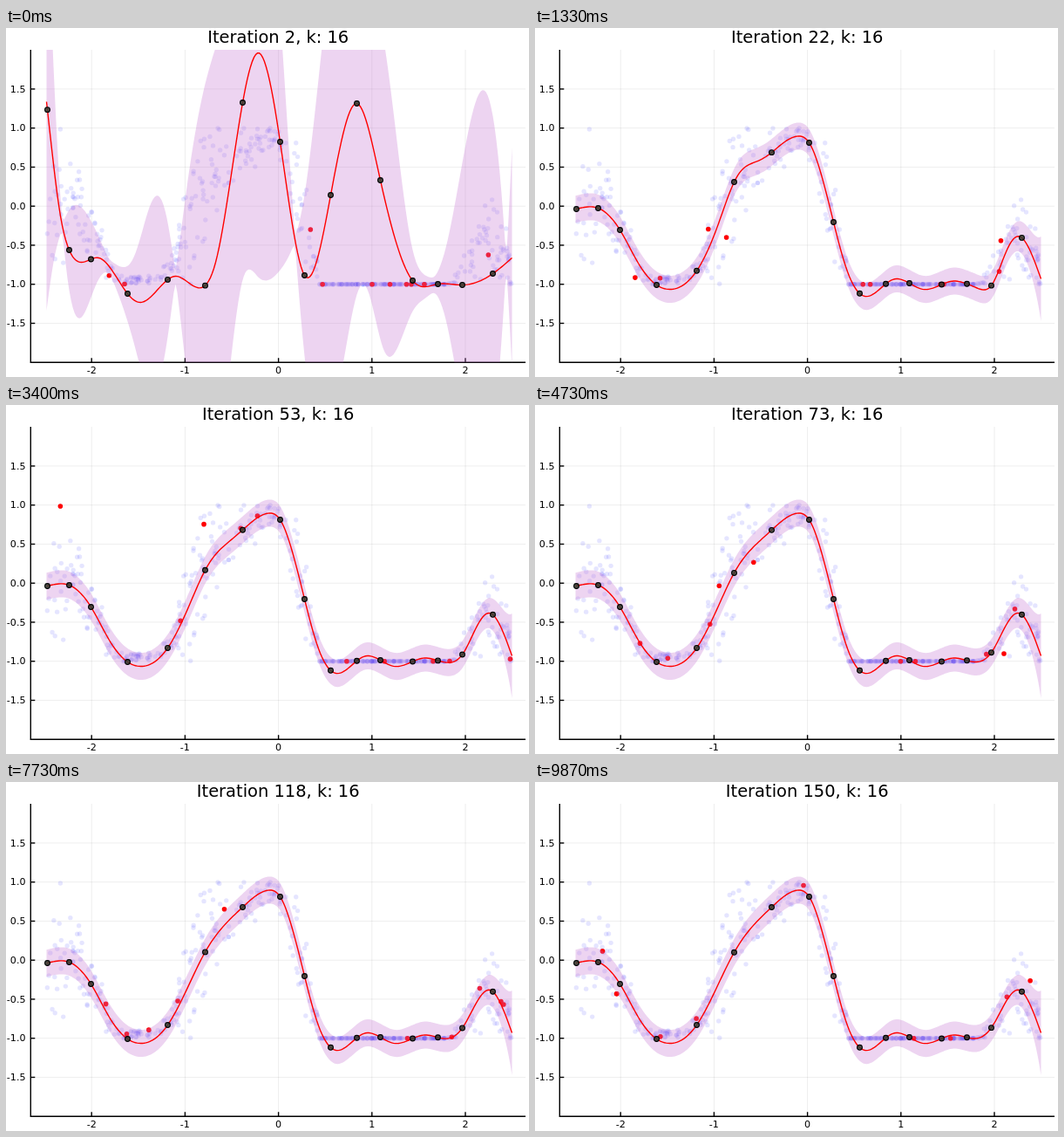
Recreate the animation shown at these times as an HTML page with a canvas. Size 600 by 400 pixels, loop 9.94 s.

```html
<!DOCTYPE html>
<html lang="en">
<head>
<meta charset="utf-8">
<title>Sparse regression fit</title>
<style>
html, body { margin: 0; width: 100%; height: 100%; overflow: hidden; background: #fff; }
canvas { display: block; }
</style>
</head>
<body>
<canvas id="plot" width="600" height="400"></canvas>
<script>
const ctx = document.getElementById('plot').getContext('2d');
const LOOP = 9940, STEP = 200 / 3, LAST = 148;
const LEFT = 28.3, RIGHT = 596, TOP = 25, BOTTOM = 383.2;
const px = v => 312.6 + 107.2 * v, py = v => 204.2 - 89.5 * v;
const CEIL = py(1), FLOOR = py(-1);
const lerp = (a, b, t) => a + (b - a) * t;
const bump = (x, center, width) => Math.exp(-(((x - center) / width) ** 2));

// Natural cubic spline through x, y, x, y, ...
function curve(...points) {
  const xs = points.filter((_, i) => i % 2 === 0), ys = points.filter((_, i) => i % 2);
  const n = xs.length, m = Array(n).fill(0), c = [0], d = [0];
  for (let i = 1; i < n - 1; i++) {
    const h0 = xs[i] - xs[i - 1], h1 = xs[i + 1] - xs[i];
    const bend = 6 * ((ys[i + 1] - ys[i]) / h1 - (ys[i] - ys[i - 1]) / h0);
    const pivot = 2 * (h0 + h1) - h0 * c[i - 1];
    c[i] = h1 / pivot;
    d[i] = (bend - h0 * d[i - 1]) / pivot;
  }
  for (let i = n - 2; i > 0; i--) m[i] = d[i] - c[i] * m[i + 1];
  return x => {
    let i = 1;
    while (i < n - 1 && x > xs[i]) i++;
    const h = xs[i] - xs[i - 1], a = (xs[i] - x) / h, b = 1 - a;
    return a * ys[i - 1] + b * ys[i] + ((a ** 3 - a) * m[i - 1] + (b ** 3 - b) * m[i]) * h * h / 6;
  };
}

const startMean = curve(46, 84, 53, 147, 61, 209, 72, 254, 85, 268, 106, 263, 139, 304, 153, 314,
  194, 284, 219, 297, 240, 268, 271, 85, 289, 28, 314, 130, 342, 283, 372, 191, 402, 86,
  429, 174, 466, 289, 495, 293, 523, 294, 558, 281, 580, 263);
// Signed half width: the band pinches where it crosses zero
const startSpread = curve(46, 239, 54, 112, 63, 10, 82, -64, 100, -36, 118, 0, 145, 45, 168, 109,
  181, 86, 194, 0, 207, -108, 226, -224, 240, -246, 258, -208, 271, -203, 289, -257, 317, -122,
  331, 0, 362, 221, 387, 262, 413, 190, 434, 175, 466, 34, 486, 4, 504, -40, 545, -217,
  572, -24, 580, 126);
const settledMean = curve(47, 207, 72, 206, 97, 231, 118, 269, 139, 294, 153, 299, 185, 278, 228, 195,
  271, 143, 301, 123.5, 314, 131, 342, 222, 357, 276, 378, 307, 411, 287.5, 445, 299,
  480, 289.5, 508, 293, 523, 281, 555, 238, 580, 287);
const settledSpread = x => 15.5 + 33 * Math.exp((x - 580) / 9);
const inducing = [47, 72, 97, 139, 185, 228, 271, 314, 342, 372, 402, 429, 466, 495, 523, 558];

function random(seed) {
  return () => {
    seed = (seed + 0x6D2B79F5) | 0;
    let r = Math.imul(seed ^ seed >>> 15, 1 | seed);
    r ^= r + Math.imul(r ^ r >>> 7, 61 | r);
    return ((r ^ r >>> 14) >>> 0) / 4294967296;
  };
}

// Samples scatter around the settled curve, folded back at both limits
const rand = random(16);
const noiseAt = x => 4 + 42 * bump(x, 58, 38) + 38 * bump(x, 222, 26) + 12 * bump(x, 275, 35)
  + 32 * bump(x, 335, 12) + 24 * bump(x, 560, 28);
const data = Array.from({ length: 490 }, () => {
  const x = lerp(44, 580, rand());
  const noise = (rand() + rand() + rand() - 1.5) * 2 * noiseAt(x);
  if (x > 357 && x < 505) return [x, FLOOR];
  let y = settledMean(x) + noise;
  if (y > FLOOR) y = 2 * FLOOR - y;
  if (y < CEIL) y = 2 * CEIL - y;
  return [x, y];
});

function minibatch(step) {
  const pick = random(step * 977 + 5);
  return Array.from({ length: 10 }, () => data[Math.floor(pick() * data.length)]);
}

function line(x0, y0, x1, y1, color, width) {
  ctx.strokeStyle = color;
  ctx.lineWidth = width;
  ctx.beginPath();
  ctx.moveTo(x0, y0);
  ctx.lineTo(x1, y1);
  ctx.stroke();
}
function dot(x, y, r, color) {
  ctx.fillStyle = color;
  ctx.beginPath();
  ctx.arc(x, y, r, 0, 2 * Math.PI);
  ctx.fill();
}
function label(text, x, y, size, align) {
  ctx.font = size + 'px "DejaVu Sans", sans-serif';
  ctx.textAlign = align;
  ctx.fillStyle = '#000';
  ctx.fillText(text, x, y);
}

function drawAxes() {
  const grid = 'rgba(0,0,0,.1)';
  for (let v = -2; v <= 2; v++) {
    line(px(v), TOP, px(v), BOTTOM, grid, 0.7);
    line(px(v), BOTTOM, px(v), BOTTOM - 5, '#000', 1.4);
    label(v, px(v), 396, 11.1, 'center');
  }
  for (let v = -1.5; v <= 1.5; v += 0.5) {
    line(LEFT, py(v), RIGHT, py(v), grid, 0.7);
    line(LEFT, py(v), LEFT + 5, py(v), '#000', 1.4);
    label(v.toFixed(1), 22.5, py(v) + 3.6, 11.1, 'right');
  }
  line(LEFT, TOP, LEFT, BOTTOM + 0.7, '#000', 1.4);
  line(LEFT, BOTTOM, RIGHT, BOTTOM, '#000', 1.4);
}

function draw(step) {
  const early = Math.max(0, 1 - step / 20) ** 4, slow = Math.exp(-step / 28);
  // Two stretches settle more slowly than the rest
  const late = x => settledMean(x) + slow * (28 * bump(x, 524, 16) - 40 * bump(x, 232, 22));
  const mean = x => lerp(late(x), startMean(x), early);
  const spread = x => lerp(settledSpread(x), Math.hypot(startSpread(x), 9), early);
  const xs = Array.from({ length: 268 }, (_, i) => 46 + i * 2);

  ctx.clearRect(0, 0, 600, 400);
  drawAxes();
  label(`Iteration ${step + 2}, k: 16`, 312.2, 17, 19.44, 'center');

  ctx.save();
  ctx.beginPath();
  ctx.rect(LEFT, TOP, RIGHT - LEFT, BOTTOM - TOP);
  ctx.clip();
  for (const [x, y] of data) dot(x, y, 2.7, 'rgba(0,0,255,.1)');
  for (const [x, y] of minibatch(step)) dot(x, y, 2.8, '#f00');

  ctx.translate(0.5, 0.5);
  ctx.fillStyle = 'rgba(194,113,210,.3)';
  ctx.beginPath();
  for (const x of xs) ctx.lineTo(x, mean(x) - spread(x));
  for (const x of [...xs].reverse()) ctx.lineTo(x, mean(x) + spread(x));
  ctx.fill();

  ctx.strokeStyle = '#f00';
  ctx.lineWidth = 1.4;
  ctx.beginPath();
  for (const x of xs) ctx.lineTo(x, mean(x));
  ctx.stroke();

  for (const x of inducing) {
    dot(x, mean(x), 2.9, 'rgba(50,60,50,.85)');
    ctx.strokeStyle = '#000';
    ctx.lineWidth = 1.1;
    ctx.stroke();
  }
  ctx.restore();
}

let shown = -1;
function tick() {
  const time = Math.floor(performance.now() % LOOP / 10) * 10;
  const step = Math.min(LAST, Math.floor((time + 5) / STEP));
  if (step !== shown) draw(shown = step);
  requestAnimationFrame(tick);
}
tick();
</script>
</body>
</html>
```
